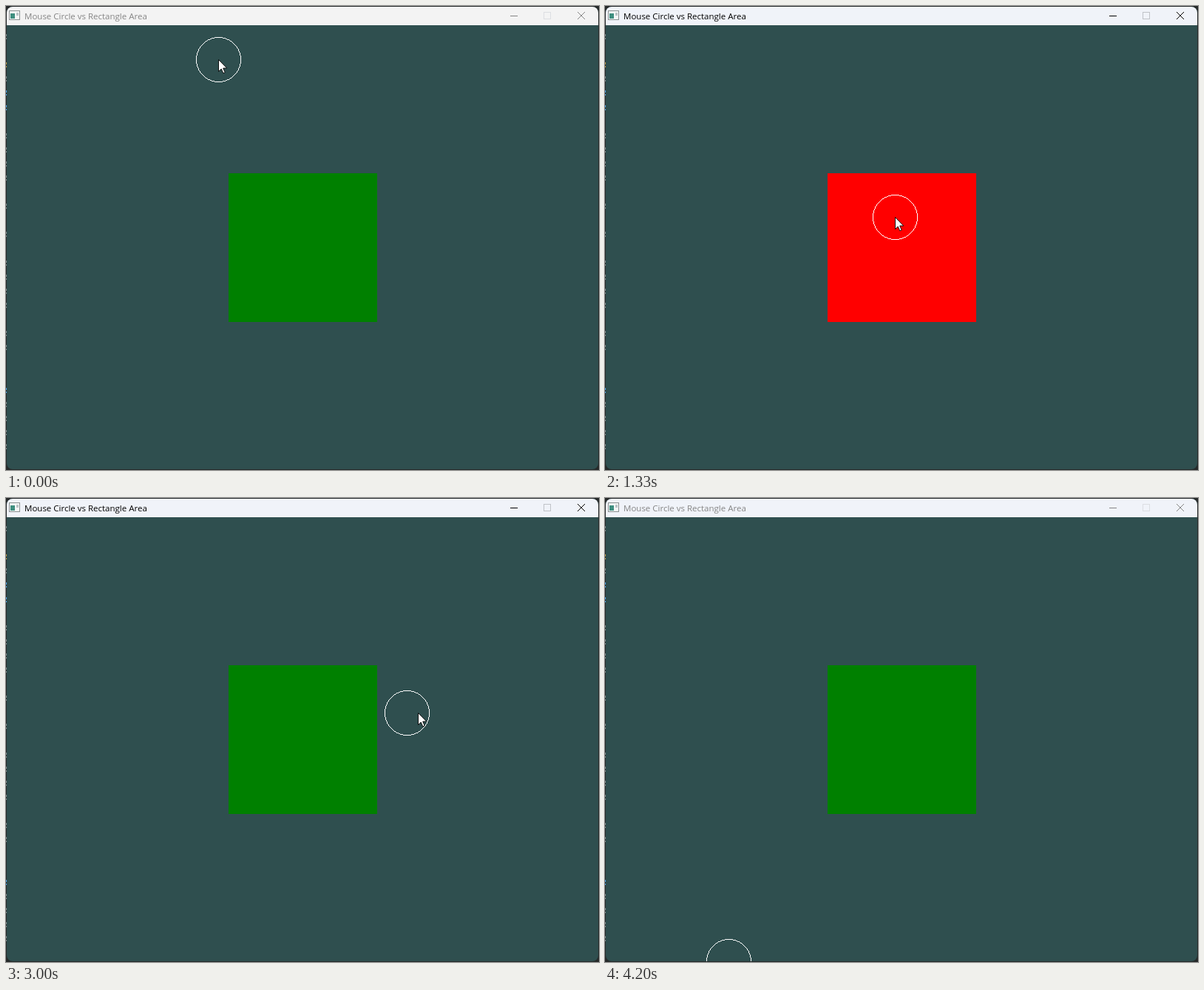
Animation of 802 by 627 pixels, one loop 4270 ms. Source, as an HTML page:

```html
<!DOCTYPE html>
<html lang="en">
<head>
<meta charset="utf-8">
<title>Mouse Circle vs Rectangle Area</title>
<style>
  html, body { margin: 0; width: 100%; height: 100%; overflow: hidden; background: #262a2a; }
  svg { display: block; }
  text { font: 11.5px "Open Sans", "Noto Sans", sans-serif; }
</style>
</head>
<body>
<svg width="802" height="627" viewBox="0 0 802 627">
  <defs><clipPath id="win"><rect x="1" y="1" width="800" height="625" rx="8"/></clipPath></defs>
  <rect width="802" height="627" fill="#262a2a"/>
  <g id="specks" shape-rendering="crispEdges"></g>
  <g clip-path="url(#win)">
    <rect width="802" height="627" fill="#2f4f4f"/>
    <rect id="bar" width="802" height="26"/>
    <g shape-rendering="crispEdges">
      <rect x="4.5" y="6.5" width="14" height="12" fill="#f4f6f6" stroke="#8a9292"/>
      <rect x="6" y="10" width="6" height="7" fill="#3f8f80"/>
      <rect x="14" y="9" width="3" height="4" fill="#b9c4c6"/>
    </g>
    <text id="title" x="25" y="18">Mouse Circle vs Rectangle Area</text>
    <g id="buttons" fill="none">
      <path d="M682 13.5h10M773 8l10 10M783 8l-10 10"/>
      <rect id="max" x="727.5" y="8.5" width="9" height="9"/>
    </g>
    <rect id="box" x="301" y="226" width="201" height="201"/>
    <path id="ring" fill="#fff" shape-rendering="crispEdges"/>
    <path id="cursor" d="M.5 .5V16.5L4.2 13L6.8 18.8L9.2 17.8L6.7 12H11.7Z" fill="#fff" stroke="#000" stroke-width=".9"/>
  </g>
</svg>
<script>
const LOOP = 4270, FPS = 15, LAST = 63;
const RADIUS = 30;
const LEAD = .22; // the pointer runs this many steps ahead of the ring

const el = id => document.getElementById(id);
const set = (id, attrs) => {
  for (const k in attrs) el(id).setAttribute(k, attrs[k]);
};
const clamp = (v, lo, hi) => Math.min(hi, Math.max(lo, v));
const smooth = u => u * u * (3 - 2 * u);

// Mouse moves between rests, in steps; pace below 1 is a quick start, bend bows the path
const home = [287, 72];
const moves = [
  { from: 2, to: 3, end: [288, 74] },
  { from: 6, to: 14, end: [390, 249], pace: 1.17, bend: 8 },
  { from: 16, to: 20, end: [392, 285] },
  { from: 24, to: 28, end: [554, 293], pace: .46 },
  { from: 34, to: 38, end: [425, 290], pace: .425 },
  { from: 44, to: 47, end: [609, 290], pace: .48 },
  { from: 52, to: 58, end: [167, 626], pace: .8 }
];

function mouse(step, ahead = 0) {
  const i = Math.max(0, moves.findLastIndex(m => m.from < step));
  const { from, to, end, pace = 1, bend = 0 } = moves[i];
  const [x, y] = i ? moves[i - 1].end : home;
  const dx = end[0] - x, dy = end[1] - y;
  const p = smooth(clamp((step + ahead - from) / (to - from), 0, 1) ** pace);
  const bow = bend * Math.sin(Math.PI * p) / Math.hypot(dx, dy);
  return [Math.round(x + dx * p + dy * bow), Math.round(y + dy * p - dx * bow)];
}

// One-pixel circle outline, mirrored from a single octant
function pixelRing(r) {
  let d = '';
  for (let a = 0; a <= r * Math.SQRT1_2; a++) {
    const b = Math.round(Math.sqrt(r * r - a * a));
    for (const s of [-1, 1]) for (const t of [-1, 1])
      d += `M${a * s} ${b * t}h1v1h-1zM${b * t} ${a * s}h1v1h-1z`;
  }
  return d;
}

// Slivers of the editor lines behind the window
function editorSpecks() {
  let svg = '';
  for (let line = 0; line < 30; line++) {
    const random = Math.abs(Math.sin(line * 12.99 + 4) * 43758.5) % 1;
    const color = random < .1 ? '#4a9be0' : random < .15 ? '#b8923f' : '#7d8484';
    if (random < .6) svg += `<path d="M.5 ${Math.round(38 + line * 19.1)}v3m0 2v2" stroke="${color}"/>`;
  }
  return svg;
}

function draw(step) {
  const [x, y] = mouse(step);
  const active = step > 0 && step < LAST;
  const ink = active ? '#000' : '#858585';
  set('bar', { fill: step === 0 ? '#f3f3f3' : '#f0f3f9' });
  set('title', { fill: ink });
  set('buttons', { stroke: ink });
  set('max', { stroke: active ? '#c0c3c8' : '#dcdee2' });

  const gap = Math.hypot(x - clamp(x, 301, 501), y - clamp(y, 226, 426));
  set('box', { fill: gap <= RADIUS ? '#f00' : '#008000' });
  set('ring', { transform: `translate(${x} ${y})` });
  set('cursor', { transform: `translate(${mouse(step, LEAD)})` });
}

set('ring', { d: pixelRing(RADIUS) });
el('specks').innerHTML = editorSpecks();

const start = performance.now();
function tick() {
  const t = (performance.now() - start) % LOOP;
  // Steps change at times rounded to 10 ms
  draw(Math.min(LAST, Math.floor((t + 3.4) * FPS / 1000)));
  requestAnimationFrame(tick);
}
tick();
</script>
</body>
</html>
```
